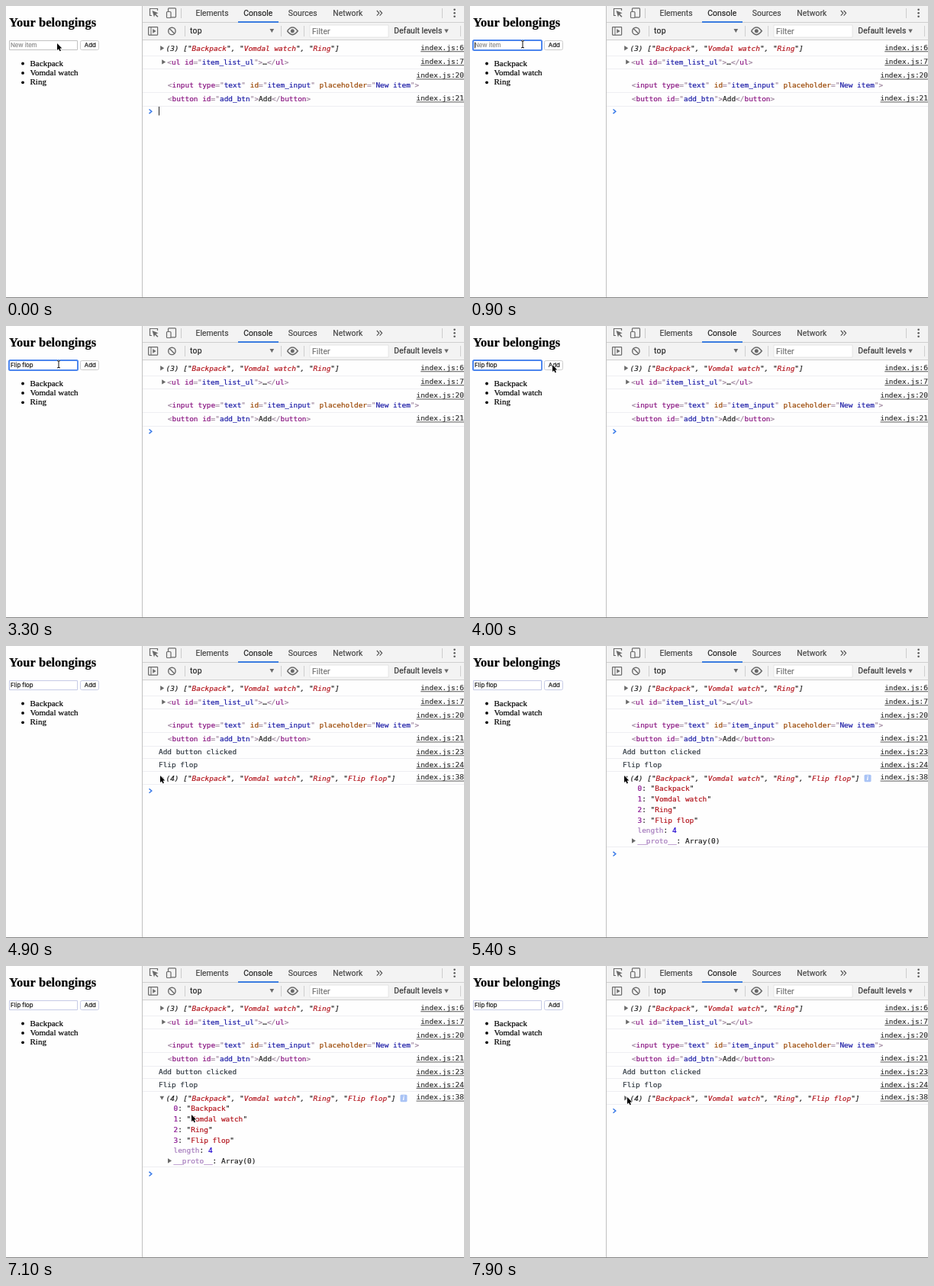
Animation, 600 px wide and 383 px high, one loop 8000 ms. Source, as an HTML page with a canvas:

```html
<!DOCTYPE html>
<html lang="en">
<head>
<meta charset="utf-8">
<title>Your belongings</title>
<style>
  html, body { margin: 0; width: 100%; height: 100%; overflow: hidden; background: #fefefe; }
  canvas { display: block; width: 600px; height: 383px; }
</style>
</head>
<body>
<canvas id="stage"></canvas>
<script>
const W = 600, H = 383, LOOP = 8000;
const canvas = document.getElementById('stage');
const ctx = canvas.getContext('2d');
const ratio = window.devicePixelRatio || 1;
canvas.width = W * ratio;
canvas.height = H * ratio;

const MONO_SIZE = 9.435, CHAR = MONO_SIZE * 0.602;
const MONO = `${MONO_SIZE}px "DejaVu Sans Mono", monospace`;
const UI = '10.35px Roboto, sans-serif';
const FIELD = '7.8px Inter, sans-serif';
const SERIF = '"Liberation Serif", serif';
const INK = '#222', ICON = '#6a6a6a', RULE = '#eeeef2';
const TAG = '#881280', BRACKET = '#a088a0', ATTR = '#994500', VALUE = '#1a1aa6', STRING = '#b3141c';
const PURPLE = '#881391', PALE = '#a57bbd', BLUE = '#1c00cf';

const ITEMS = ['Backpack', 'Vomdal watch', 'Ring'];
const NEW_ITEM = 'Flip flop';
const KEY_TIMES = [1100, 1250, 1400, 1550, 1850, 2000, 2150, 2300, 2450];
const FOCUS = 600, CLICK = 4200, EXPAND = 5200, COLLAPSE = 7600;

// time, x, y of the pointer tip
const PATH = [
  [0, 67, 49], [200, 69, 50], [3500, 69, 50], [4000, 108, 51], [4300, 108, 51],
  [4500, 145, 113], [4620, 170, 151], [4800, 202, 170], [5400, 202, 170],
  [5650, 217, 192], [6000, 242, 228], [6400, 242, 228], [6800, 243, 195],
  [7150, 243, 195], [7500, 206, 172], [8000, 206, 172]
];

// A hairline stroke gives the slightly heavy look of smoothed screen text
function text(str, x, y, font, color = INK, spacing = 0) {
  ctx.font = font;
  ctx.letterSpacing = spacing + 'px';
  ctx.fillStyle = ctx.strokeStyle = color;
  ctx.lineWidth = 0.2;
  ctx.fillText(str, x, y);
  ctx.strokeText(str, x, y);
  ctx.letterSpacing = '0px';
}

function rect(x, y, w, h, color) {
  ctx.fillStyle = color;
  ctx.fillRect(x, y, w, h);
}

function box(x, y, w, h, r, fill, stroke, width = 1) {
  ctx.beginPath();
  ctx.roundRect(x, y, w, h, r);
  if (fill) { ctx.fillStyle = fill; ctx.fill(); }
  if (stroke) { ctx.strokeStyle = stroke; ctx.lineWidth = width; ctx.stroke(); }
}

function trace(points, close) {
  ctx.beginPath();
  points.forEach(([x, y]) => ctx.lineTo(x, y));
  if (close) ctx.closePath();
}

function line(points, color, width = 1) {
  trace(points);
  ctx.strokeStyle = color;
  ctx.lineWidth = width;
  ctx.stroke();
}

function fill(points, color) {
  trace(points, true);
  ctx.fillStyle = color;
  ctx.fill();
}

function disc(x, y, r, color) {
  ctx.beginPath();
  ctx.arc(x, y, r, 0, 7);
  ctx.fillStyle = color;
  ctx.fill();
}

function ring(x, y, r, color, width) {
  ctx.beginPath();
  ctx.arc(x, y, r, 0, 7);
  ctx.strokeStyle = color;
  ctx.lineWidth = width;
  ctx.stroke();
}

const right = (x, y) => fill([[x, y - 3.2], [x + 5, y], [x, y + 3.2]], ICON);
const down = (x, y) => fill([[x - 2.8, y - 2.4], [x + 2.8, y - 2.4], [x, y + 2.6]], ICON);

// Monospaced run of [text, colour] pairs
function run(parts, x, y, style = '') {
  for (const [str, color] of parts) {
    text(str, x, y, style + MONO, color);
    x += str.length * CHAR;
  }
}

function markup(src) {
  const parts = [];
  let last = '';
  for (const s of src.match(/<\/?|\w+(?==")|="|[^"<>=]+(?=")|">|"|>|…|[^<>"=…]+/g)) {
    let color = BRACKET;
    if (last === '="') color = VALUE;
    else if (last[0] === '<') color = TAG;
    else if (/[\w…]/.test(s)) color = last.endsWith('>') ? INK : ATTR;
    // a tag name and its first attribute arrive as one piece split by a space
    parts.push([s, color]);
    last = s;
  }
  return parts;
}

const quoted = src => src.split(/"([^"]*)"/).flatMap((s, i) =>
  i % 2 ? [['"', INK], [s, STRING], ['"', INK]] : [[s, INK]]);

function arrayRow(items, y) {
  const list = items.map(s => `"${s}"`).join(', ');
  run(quoted(`(${items.length}) [${list}]`), 209.5, y, 'italic ');
}

function link(n, y) {
  const str = 'index.js:' + n, x = 600 - str.length * CHAR;
  text(str, x, y, MONO, '#333');
  rect(x, y + 1.3, 600 - x, 0.9, '#444');
}

function rule(y) { rect(179, y, 421, 1, RULE); }

function prompt(y) {
  line([[187.5, y - 2.8], [190.8, y], [187.5, y + 2.8]], '#3678e8', 1.5);
}

function drawPage(t) {
  text('Your belongings', 4, 26.8, `bold 16.5px ${SERIF}`, '#000');
  const typed = NEW_ITEM.slice(0, KEY_TIMES.filter(k => t >= k).length);
  const focused = t >= FOCUS && t < CLICK;
  box(4.5, 45.5, 89, 12, 0, '#fff', t < CLICK ? '#c2c2c2' : '#c6cbe6');
  if (focused) box(4, 45, 90, 13, 1.5, null, '#4c86ee', 2);
  text(typed || 'New item', 6, 54.2, FIELD, typed ? '#111' : '#8c8c8c');
  if (focused && ((t > KEY_TIMES[0] && t < 2900) || t % 1000 > 500)) {
    ctx.font = FIELD;
    rect(6 + ctx.measureText(typed).width, 47.5, 0.8, 8, '#000');
  }
  const pressed = t >= CLICK - 100 && t < CLICK;
  box(97.5, 45.5, 24, 12, 2, pressed ? '#dfe6f5' : '#fff', t < CLICK ? '#cccccc' : '#c6cbe6');
  text('Add', 102.8, 54.2, FIELD, '#111');
  ITEMS.forEach((s, i) => {
    const y = 78.5 + i * 12.4;
    disc(22, y - 3, 1.9, '#000');
    text(s, 31.5, y, `11.03px ${SERIF}`, '#000');
  });
}

function drawToolbar() {
  rect(179, 0, 421, 44, '#f3f3f3');
  rect(179, 21, 421, 1, '#cfcfcf');
  rect(179, 44, 421, 1, '#cfcfcf');

  line([[191, 12.5], [188.5, 12.5], [188.5, 3.5], [198.5, 3.5], [198.5, 6]], ICON, 1.2);
  fill([[191.5, 6], [199.5, 9.2], [196.3, 10.4], [199.5, 13.7], [198.3, 14.8], [195.2, 11.6], [194, 14.5]], ICON);
  box(212.5, 2.8, 10, 12, 1, null, ICON, 1.2);
  box(210.5, 7.5, 5.5, 8, 1, '#f3f3f3', ICON, 1.2);
  for (const x of [229, 571]) rect(x, 3, 1, 13, '#cccccc');

  text('Elements', 248.5, 12.6, UI, '#444', 0.03);
  text('Console', 311.3, 12.6, UI, INK, 0.06);
  text('Sources', 369.8, 12.6, UI, '#444', 0.06);
  text('Network', 428.2, 12.6, UI, '#444', 0.06);
  rect(304, 20, 53, 2, '#3b7de0');
  for (const x of [485.8, 489.6]) line([[x, 6], [x + 3, 9.3], [x, 12.6]], '#555', 1.2);
  for (const y of [4.7, 9.2, 13.7]) disc(587.6, y, 1.25, '#555');

  box(186.6, 27.6, 12, 10.5, 0.5, null, ICON, 1.2);
  rect(189.5, 28, 1, 10, ICON);
  fill([[192.3, 30], [196.6, 32.9], [192.3, 35.8]], ICON);
  ring(217.4, 32.9, 4.7, ICON, 1.4);
  line([[214.1, 29.6], [220.7, 36.2]], ICON, 1.4);
  for (const x of [234, 360, 390, 595]) rect(x, 26, 1, 14, '#cfcfcf');
  text('top', 241, 36.3, UI, INK, 0.25);
  down(348.3, 32.5);

  ctx.beginPath();
  ctx.moveTo(368.5, 32.8);
  ctx.quadraticCurveTo(375.3, 23.2, 382.2, 32.8);
  ctx.quadraticCurveTo(375.3, 42.4, 368.5, 32.8);
  ctx.strokeStyle = ICON;
  ctx.lineWidth = 1.6;
  ctx.stroke();
  disc(375.3, 32.8, 2.5, ICON);

  box(398, 25, 103, 16, 0, '#fff', '#e0e0e0', 0.8);
  text('Filter', 401, 36.5, UI, '#757575', 0.1);
  text('Default levels', 508.3, 36.3, UI, '#333', 0.08);
  down(577, 33);
}

function drawDetails() {
  [...ITEMS, NEW_ITEM].forEach((s, i) => {
    run([[String(i), PURPLE], [': ', INK], ...quoted(`"${s}"`)], 219.5, 190.2 + i * 13.85);
  });
  run([['length', PALE], [': ', INK], ['4', BLUE]], 219.5, 245.4);
  right(212, 255.5);
  run([['__proto__', PALE], [': Array(0)', INK]], 219.5, 259.2);
  box(516.5, 168.7, 9, 9.5, 1.5, '#a9c3f5');
  text('i', 519.7, 176.3, `italic bold 8px ${SERIF}`, '#fff');
}

function drawConsole(t) {
  right(202.2, 55.2);
  arrayRow(ITEMS, 58.5);
  link(6, 58);
  rule(65);
  right(204.2, 73.4);
  run(markup('<ul id="item_list_ul">…</ul>'), 211.3, 76.8);
  link(7, 76);
  rule(82);
  link(20, 94.2);
  run(markup('<input type="text" id="item_input" placeholder="New item">'), 211.8, 106.8);
  rule(113);
  run(markup('<button id="add_btn">Add</button>'), 211.8, 125.3);
  link(21, 124.2);
  rule(131);

  if (t < CLICK) {
    prompt(138.3);
    if (t < FOCUS) rect(200, 132, 1, 11.5, '#222');
    return;
  }

  text('Add button clicked', 200, 142, MONO, '#303942');
  link(23, 142);
  rule(147);
  text(NEW_ITEM, 200, 158.6, MONO, '#303942');
  link(24, 158.6);
  rule(164);
  arrayRow([...ITEMS, NEW_ITEM], 176.6);
  link(38, 175.3);
  if (t >= EXPAND && t < COLLAPSE) {
    down(204.3, 173.2);
    drawDetails();
    rule(263);
    prompt(272.7);
  } else {
    right(202.2, 173.2);
    rule(181);
    prompt(190);
  }
}

function pointerAt(t) {
  const i = Math.max(1, PATH.findIndex(p => p[0] > t));
  const [t0, x0, y0] = PATH[i - 1], [t1, x1, y1] = PATH[i];
  const k = (t - t0) / (t1 - t0);
  return [x0 + (x1 - x0) * k, y0 + (y1 - y0) * k];
}

function drawPointer(t) {
  if (t >= KEY_TIMES[0] && t < 3200) return;
  const [x, y] = pointerAt(t);
  ctx.save();
  ctx.translate(x, y);
  if (t >= 100 && x < 95) {
    const beam = [[-2, -4.5], [0, -3.8], [2, -4.5]];
    const parts = [beam, [[0, -4], [0, 5]], beam.map(([a, b]) => [a, 0.5 - b])];
    for (const p of parts) line(p, '#fff', 2);
    for (const p of parts) line(p, '#111', 1);
  } else {
    ctx.scale(0.88, 0.88);
    trace([[0, 0], [0, 10.2], [2.3, 8.1], [3.9, 11.7], [5.6, 11], [4.1, 7.4], [7.2, 7.3]], true);
    ctx.lineJoin = 'round';
    ctx.strokeStyle = '#fff';
    ctx.lineWidth = 1.6;
    ctx.stroke();
    ctx.fillStyle = '#000';
    ctx.fill();
  }
  ctx.restore();
}

function draw(t) {
  ctx.setTransform(ratio, 0, 0, ratio, 0, 0);
  rect(0, 0, W, H, '#fefefe');
  drawPage(t);
  drawToolbar();
  drawConsole(t);
  rect(178, 0, 1, H, '#c0c0c0');
  rect(0, 382, W, 1, '#858585');
  drawPointer(t);
}

const start = performance.now();
function loop() {
  draw((performance.now() - start) % LOOP);
  requestAnimationFrame(loop);
}
loop();
</script>
</body>
</html>
```
